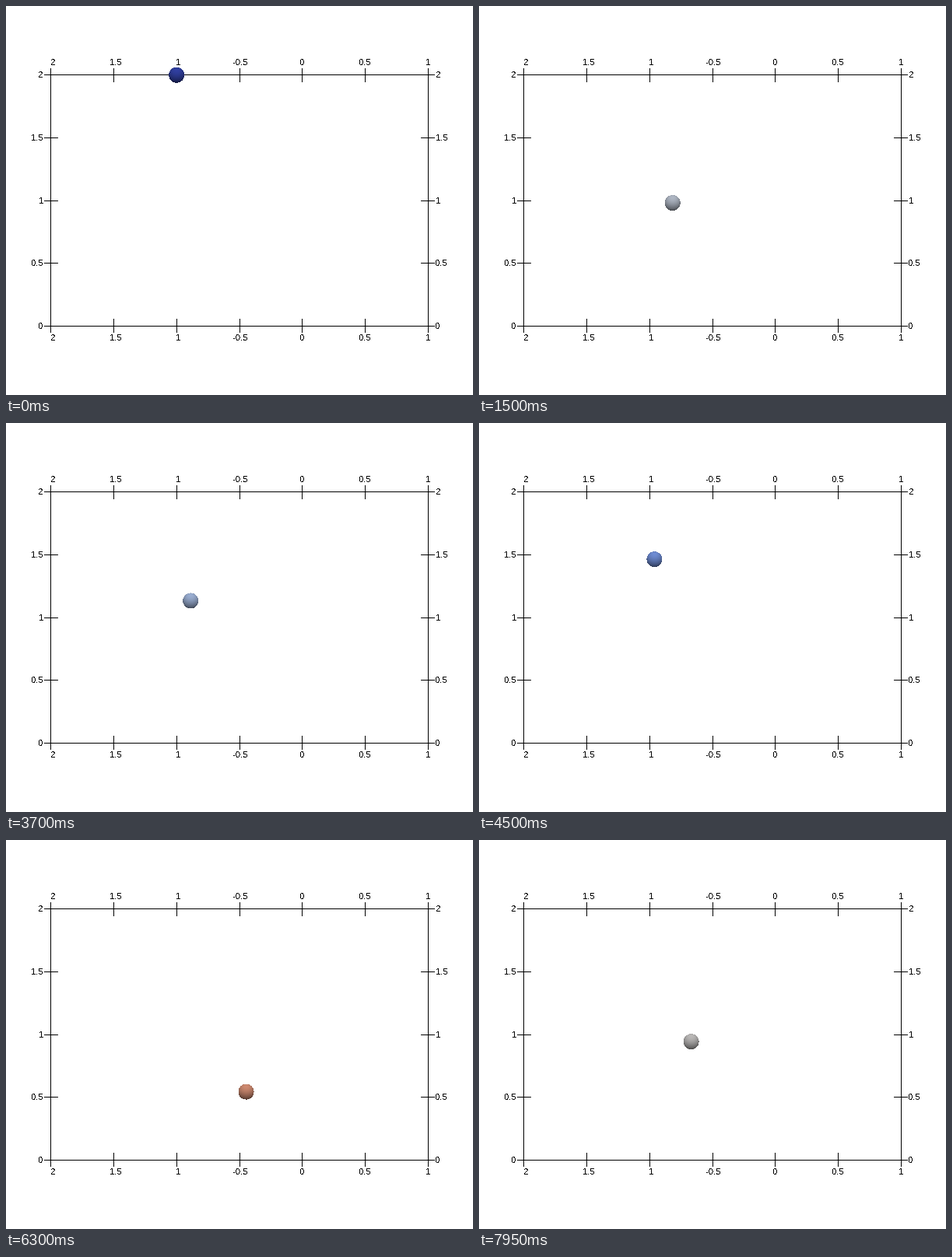
Recreate the animation shown at these times as a matplotlib script. Size 600 by 500 pixels, loop 8 s.

```python
import math

import matplotlib.pyplot as plt
import numpy as np
from matplotlib.animation import FuncAnimation
from matplotlib.patches import Rectangle

W, H, DPI = 600, 500, 100
FRAMES, STEP = 160, 50
DT, GRAVITY, BOUNCE = 0.05, 1.0, 0.9
RADIUS, CELL = 10, 24

fig = plt.figure(figsize=(W / DPI, H / DPI), dpi=DPI, facecolor="white")
ax = fig.add_axes([0, 0, 1, 1])
ax.axis("off")


def to_px(x, y):
    return 57.5 + (x + 2) * 161.67, 411.5 - y * 161.5


# ---- box, ticks and labels ----
def bar(x, y, w, h):
    ax.add_patch(Rectangle((x, y), w, h, facecolor="black", linewidth=0,
                           antialiased=False, zorder=1))


def label(x, y, text, align="center"):
    ax.text(x, y, text, ha=align, va="center_baseline", color="black",
            family="Liberation Sans", fontsize=11.3 * 72 / DPI,
            antialiased=False, zorder=1)


LEFT, RIGHT, TOP, BOTTOM = 57, 542, 88, 411
for y in (TOP, BOTTOM):
    bar(LEFT, y, RIGHT - LEFT + 1, 1)
for x in (LEFT, RIGHT):
    bar(x, TOP, 1, BOTTOM - TOP + 1)

x_names = ["2", "1.5", "1", "-0.5", "0", "0.5", "1"]
x_shift = [3.5, 3, 2.5, 1, 0.5, 0.5, 0.5]
for i, (name, shift) in enumerate(zip(x_names, x_shift)):
    x = int(to_px(-2 + i / 2, 0)[0])
    bar(x, 80, 1, 18)
    bar(x, 402, 1, 18)
    label(x + shift, 72, name)
    label(x + shift, 426, name)

for i, name in enumerate(["0", "0.5", "1", "1.5", "2"]):
    y = int(to_px(0, i / 2)[1])
    bar(49, y, 18, 1)
    bar(533, y, 18, 1)
    label(48, y, name, "right")
    label(552, y, name, "left")


# ---- motion: free flight between two slopes y = |x| ----
def flights(end):
    t, x, y, vx, vy = 0.0, -1.0, 2.0, 0.0, 0.0
    legs = []
    while t <= end:
        legs.append((t, x, y, vx, vy))
        hits = []
        for side in (-1, 1):
            gap = max(y - side * x, 0)
            rate = vy - side * vx
            root = math.sqrt(rate * rate + 2 * GRAVITY * gap)
            hits.append(((rate + root) / GRAVITY, side))
        dt, side = min(hits)
        x += vx * dt
        y += vy * dt - GRAVITY * dt * dt / 2
        vy -= GRAVITY * dt
        kick = (1 + BOUNCE) * (side * vx - vy) / 2
        vx -= side * kick
        vy += kick
        t += dt
    return legs


LEGS = flights((FRAMES + 1) * DT)


def position(t):
    t0, x, y, vx, vy = [leg for leg in LEGS if leg[0] <= t][-1]
    s = t - t0
    return x + vx * s, y + vy * s - GRAVITY * s * s / 2


# ---- shaded ball ----
cmap = plt.get_cmap("coolwarm")
grid_y, grid_x = np.mgrid[0:CELL, 0:CELL] + 0.5


def ball_patch(cx, cy, color):
    nx, ny = (grid_x - cx) / RADIUS, (cy - grid_y) / RADIUS
    r2 = nx ** 2 + ny ** 2
    nz = np.sqrt(np.clip(1 - r2, 0, 1))
    facing = np.clip(0.5 + 0.5 * (0.7 * ny + 0.714 * nz), 0, 1)
    shade = 0.26 + 0.58 * facing ** 1.4
    rgba = np.zeros((CELL, CELL, 4))
    rgba[..., :3] = shade[..., None] * np.array(color[:3])
    rgba[..., 3] = r2 <= 1
    return rgba


ball = ax.imshow(np.zeros((CELL, CELL, 4)), extent=(0, CELL, CELL, 0),
                 aspect="auto", interpolation="nearest", zorder=3)
ax.set_xlim(0, W)
ax.set_ylim(H, 0)


def draw(n):
    x, y = position((n + 1) * DT)
    px, py = to_px(x, y)
    left, top = int(px) - CELL // 2, int(py) - CELL // 2
    heat = min(max(0.25 * (x + 1) + 0.4 * (2 - y), 0), 1)
    ball.set_data(ball_patch(px - left, py - top, cmap(heat)))
    ball.set_extent((left, left + CELL, top + CELL, top))
    return (ball,)


anim = FuncAnimation(fig, draw, frames=FRAMES, interval=STEP,
                     repeat=True, repeat_delay=0)
plt.show()
```
